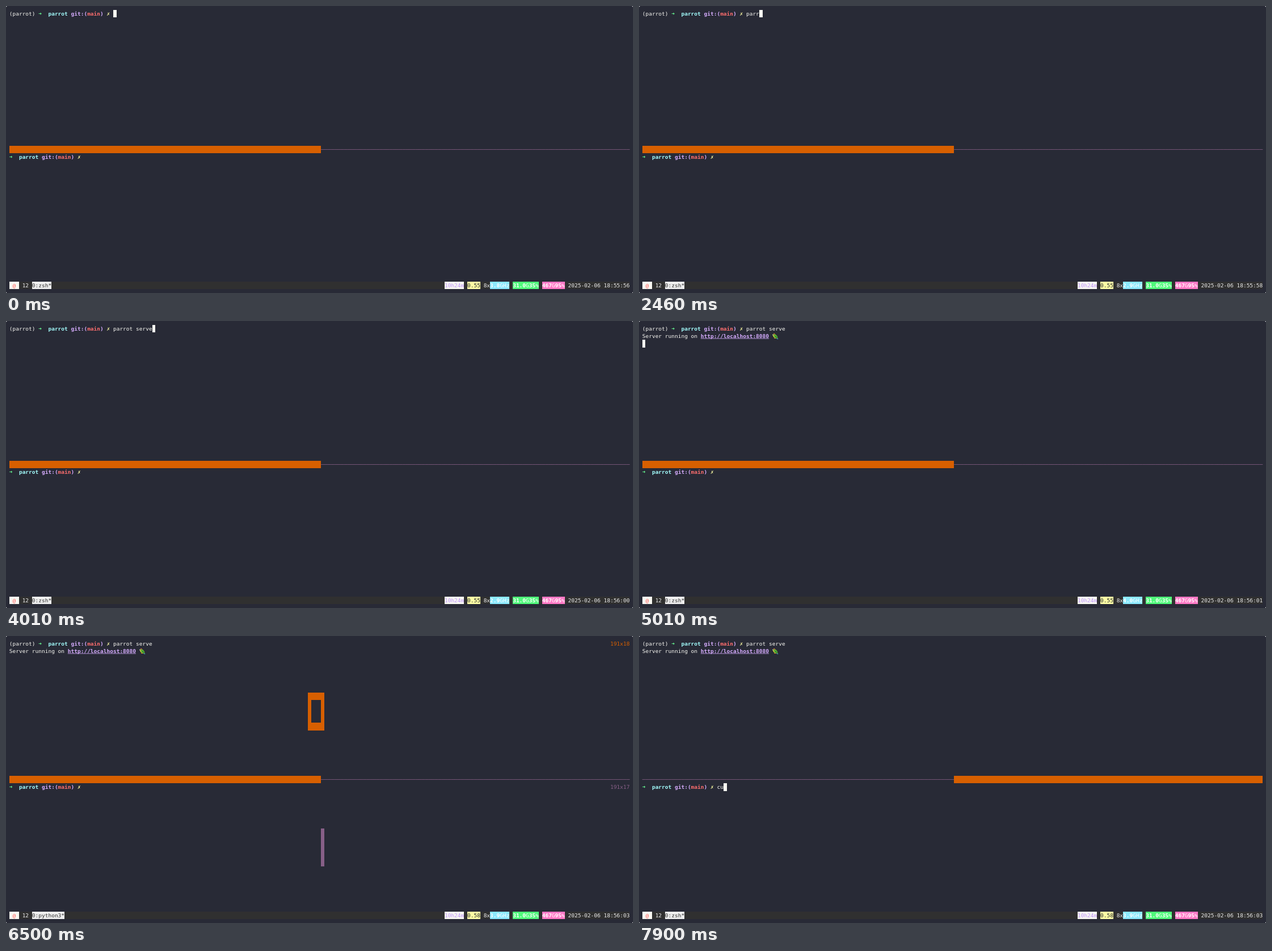
Animation of 1105 by 507 pixels, one loop 8000 ms. Source, as an HTML page:

```html
<!DOCTYPE html>
<html lang="en">
<head>
<meta charset="utf-8">
<title>Terminal session</title>
<style>
  html, body { margin: 0; width: 100%; height: 100%; overflow: hidden; background: #fff; }
  svg { display: block; width: 100vw; height: 100vh; }
  text { font: 9.53px "DejaVu Sans Mono", monospace; white-space: pre; }
  .bold { font-weight: bold; }
</style>
</head>
<body>
<svg id="stage" viewBox="0 0 1105 507" preserveAspectRatio="none">
  <rect width="1105" height="507" rx="2.8" fill="#282a36"/>
  <g id="screen"></g>
</svg>
<script>
const LOOP = 8000;
const COLS = 191, SPLIT = 96, MID = 18, BAR = 36;
const CW = 1105 / (COLS + 2), RH = 507 / 38, BASE = 9.9;
const FG = "#f8f8f2", GREEN = "#69ff94", CYAN = "#a4ffff", PURPLE = "#d6acff",
      RED = "#ff6e6e", YELLOW = "#ffffa5", ORANGE = "#d75f00", MAUVE = "#875f87",
      DARK = "#303030", LIGHT = "#eeeeee";

// Key press times for each pane.
const COMMAND = "parrot serve";
const KEYS = [1760, 1840, 2300, 2460, 2820, 2920, 3160, 3360, 3450, 3550, 3890, 3960];
const COMMAND2 = "cu";
const KEYS2 = [7790, 7900];
const ENTER = 4900, READY = 5010, RENAME = 5730, PICK = 6500, SWITCH = 6650;

// Status refreshes: time, clock, processor speed.
const STATUS = [
  [0, "18:55:56", "3.8"], [1000, "18:55:57", "3.8"], [2010, "18:55:58", "2.9"],
  [3010, "18:55:59", "2.9"], [4010, "18:56:00", "2.9"], [5010, "18:56:01", "4.0"],
  [5730, "18:56:02", "3.9"], [6500, "18:56:03", "3.9"]
];

const screen = document.getElementById("screen");
const colX = col => CW * (col + 1);
const rowY = row => RH * (row + 0.5);

function add(tag, attrs, parent = screen) {
  const el = document.createElementNS("http://www.w3.org/2000/svg", tag);
  for (const name in attrs) el.setAttribute(name, attrs[name]);
  parent.appendChild(el);
  return el;
}

function block(row, col, rows, cols, fill) {
  add("rect", { x: colX(col), y: rowY(row), width: cols * CW, height: rows * RH,
                fill, "shape-rendering": "crispEdges" });
}

// Writes text on the cell grid and returns the next free column.
function put(row, col, str, fill = FG, bold = false, bg = null) {
  if (bg) block(row, col, 1, str.length, bg);
  const xs = [...str].map((_, i) => colX(col + i).toFixed(2)).join(" ");
  const attrs = { x: xs, y: rowY(row) + BASE, fill };
  if (bold) attrs.class = "bold";
  add("text", attrs).textContent = str;
  return col + str.length;
}

function prompt(row, col) {
  put(row, col, "➜", GREEN, true);
  put(row, col + 3, "parrot", CYAN, true);
  put(row, col + 10, "git:(", PURPLE, true);
  put(row, col + 15, "main", RED, true);
  put(row, col + 19, ")", PURPLE, true);
  put(row, col + 21, "✗", YELLOW, true);
  return col + 23;
}

function cursor(row, col) {
  block(row, col, 1, 1, FG);
}

function bird(row, col) {
  const g = add("g", { transform: `translate(${colX(col)} ${rowY(row) + 1.5})` });
  const part = (d, fill) => add("path", { d, fill }, g);
  part("M7 7 L11 10.6 L9.3 10.8 L5.5 8Z", "#3d8fd1");
  part("M1 3C1 .4 5 .1 6 2.6C8.5 4 9.7 6.4 9.8 9.2C6 9.7 2.2 8.2 1.8 5Z", "#67b52e");
  part("M4.5 4C7 4.5 8.7 6.5 9.2 8.8C6.5 8.6 4.5 7 4.5 4Z", "#2f8b35");
  part("M1.2 3.5L2.8 4.2L3.8 7.5C2.2 6.8 1.6 5.4 1.2 3.5Z", "#f6c83c");
  part("M2.1 .9C3.2 .2 4.7 .6 5.3 1.7L3 2Z", "#e5533d");
  part("M1.2 1.8L.4 3.2L1.4 4.3L2.4 2.8Z", "#d8d0b8");
  part("M3.5 8.2H6.2V9.5H3.5Z", "#d98e32");
  add("circle", { cx: 2.9, cy: 2.4, r: 0.5, fill: "#222" }, g);
}

function divider(topActive) {
  const rest = COLS - SPLIT;
  if (topActive) {
    block(MID, 0, 1, SPLIT, ORANGE);
    put(MID, SPLIT, "─".repeat(rest), MAUVE);
  } else {
    put(MID, 0, "─".repeat(SPLIT), MAUVE);
    block(MID, SPLIT, 1, rest, ORANGE);
  }
}

function paneNumbers() {
  block(7, 92, 1, 5, ORANGE);
  block(8, 92, 3, 1, ORANGE);
  block(8, 96, 3, 1, ORANGE);
  block(11, 92, 1, 5, ORANGE);
  block(25, 96, 5, 1, MAUVE);
  put(0, 185, "191x18", ORANGE);
  put(MID + 1, 185, "191x17", MAUVE);
}

function statusBar(t) {
  const [, clock, speed] = STATUS.filter(s => s[0] <= t).pop();
  const job = t >= RENAME && t < SWITCH ? "python3" : "zsh";
  block(BAR, 0, 1, COLS, DARK);
  put(BAR, 0, " @ ", "#ff5555", false, FG);
  put(BAR, 4, "12", LIGHT);
  put(BAR, 7, `0:${job}*`, DARK, false, LIGHT);
  put(BAR, 134, "10h24m", "#bd93f9", false, FG);
  put(BAR, 141, t < RENAME ? "0.55" : "0.58", "#21222c", false, YELLOW);
  put(BAR, 146, "8x", LIGHT);
  meter(148, [speed, "GHz"], "#8be9fd");
  meter(155, ["31.0", "G", "35", "%"], "#50fa7b");
  meter(164, ["467", "G", "95", "%"], "#ff79c6");
  put(BAR, 172, "2025-02-06 " + clock, LIGHT);
}

// Values are bold, their units regular.
function meter(col, parts, bg) {
  parts.forEach((part, i) => { col = put(BAR, col, part, "#ffffff", i % 2 === 0, bg); });
}

function draw(t) {
  const typed = COMMAND.slice(0, KEYS.filter(k => k <= t).length);
  const typed2 = COMMAND2.slice(0, KEYS2.filter(k => k <= t).length);
  screen.replaceChildren();

  put(0, 0, "(parrot)");
  const end = put(0, prompt(0, 9), typed);
  if (t >= READY) {
    put(1, 0, "Server running on");
    put(1, 18, "http://localhost:8080", PURPLE, true);
    add("rect", { x: colX(18), y: rowY(1) + BASE + 0.7, width: 21 * CW, height: 0.8, fill: PURPLE });
    bird(1, 40);
  }
  divider(t < SWITCH);
  const end2 = put(MID + 1, prompt(MID + 1, 0), typed2);

  if (t < ENTER) cursor(0, end);
  else if (t < READY) cursor(1, 0);
  else if (t < PICK) cursor(2, 0);
  else if (t < SWITCH) paneNumbers();
  else cursor(MID + 1, end2);

  statusBar(t);
}

const STEPS = [...KEYS, ...KEYS2, ENTER, READY, RENAME, PICK, SWITCH, ...STATUS.map(s => s[0])];
let shown = -1;

function tick(now) {
  const t = now % LOOP;
  const step = Math.max(...STEPS.filter(s => s <= t));
  if (step !== shown) {
    shown = step;
    draw(step);
  }
}

const start = performance.now();
function loop() {
  tick(performance.now() - start);
  requestAnimationFrame(loop);
}
loop();
</script>
</body>
</html>
```
